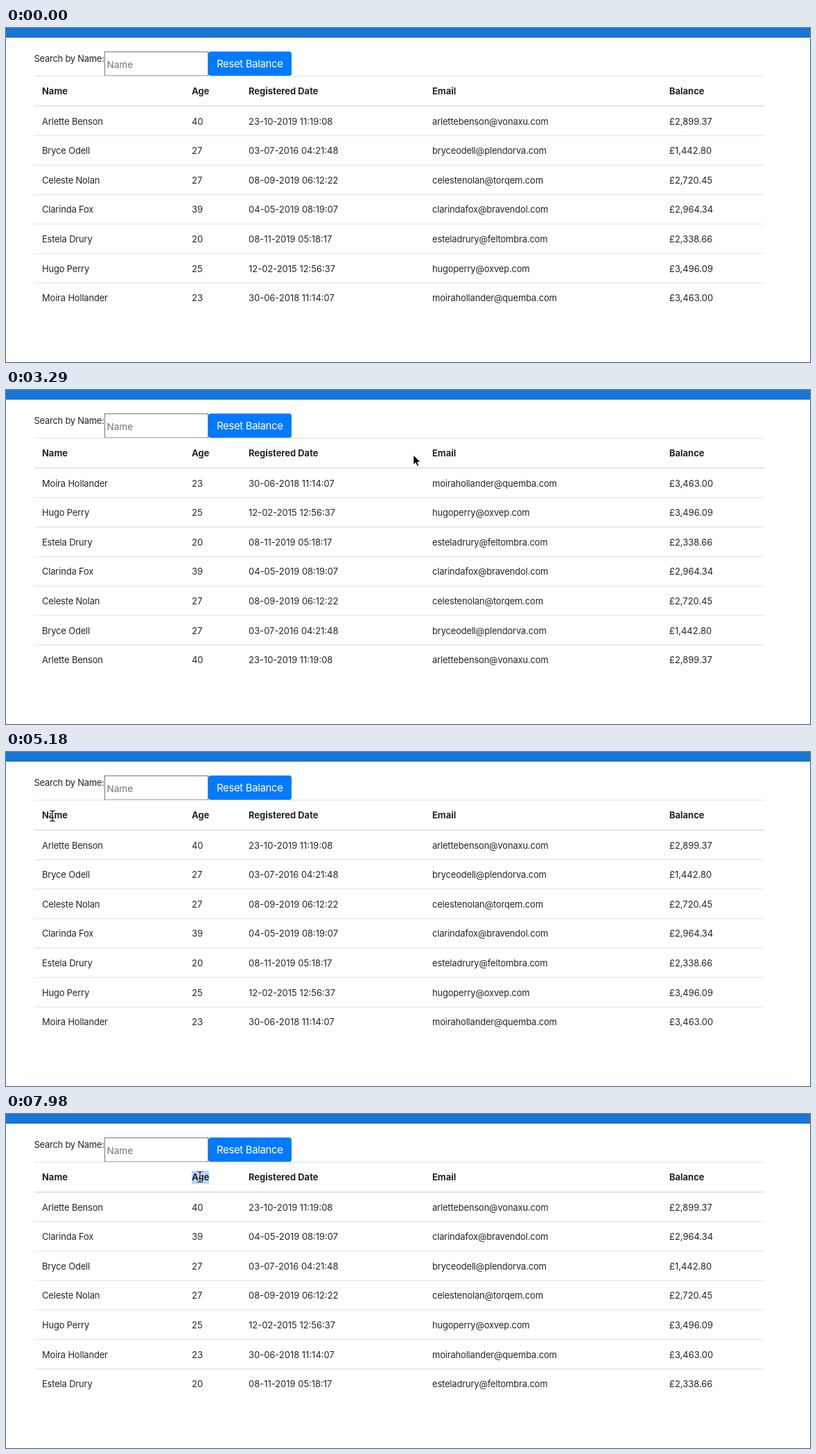
An HTML page for the animation above (8 s loop, 1160x483 px).

```html
<!DOCTYPE html>
<html lang="en">
<head>
<meta charset="utf-8">
<title>Sortable table</title>
<style>
  html, body { margin: 0; width: 100%; height: 100%; overflow: hidden; background: #fff; }
  svg { display: block; width: 1160px; height: 483px; }
  text { font: 12.96px Inter, "Liberation Sans", sans-serif; fill: #212529; white-space: pre; }
  .head text { font-weight: 700; }
  .letters { letter-spacing: -.17px; }
  .label { letter-spacing: -.25px; }
  .placeholder { font-size: 13.6px; fill: #757575; }
  .button { font-size: 14.8px; letter-spacing: -.27px; fill: #fff; }
  .line { fill: #dee2e6; }
  .halo { stroke: #fff; stroke-width: 3; }
  .ink { stroke: #000; stroke-width: 1.2; }
</style>
</head>
<body>
<svg id="stage" viewBox="0 0 1160 483">
  <defs>
    <path id="beamShape" fill="none"
      d="M-3.6 -7.6Q-.4 -7.6 0 -6.2Q.4 -7.6 3.6 -7.6M0 -6.2V6.2M-3.6 7.6Q-.4 7.6 0 6.2Q.4 7.6 3.6 7.6M-2 2.4H2"/>
  </defs>
  <rect width="1160" height="14" fill="#1976d2"/>
  <text class="label" x="40.5" y="49">Search by Name:</text>
  <rect x="142.5" y="34.5" width="149" height="34.5" fill="#fff" stroke="#767676"/>
  <text class="placeholder" x="145.5" y="57.5">Name</text>
  <rect x="292" y="34" width="120" height="35.3" rx="3.7" fill="#007bff"/>
  <text class="button" x="304" y="57.3">Reset Balance</text>
  <rect id="highlight" x="268" y="82" width="25" height="19" fill="#b3d7ff"/>
  <g id="lines"></g>
  <g id="head" class="head"></g>
  <g id="rows"></g>
  <g id="cursor">
    <path id="arrow" d="M0 0V14.2L3.3 11.2L5.5 16.3L8 15.2L5.8 10.2H10.2Z"
      fill="#000" stroke="#fff" stroke-linejoin="round"/>
    <g id="beam">
      <use href="#beamShape" class="halo"/>
      <use href="#beamShape" class="ink"/>
    </g>
  </g>
</svg>
<script>
const LOOP = 8000, STEP = 70, ROW = 42.6, ENTER = 350, SELECT = 7700;
const $ = id => document.getElementById(id);
const columns = [
  { title: 'Name', x: 52, style: 'letters' },
  { title: 'Age', x: 268 },
  { title: 'Registered Date', x: 350 },
  { title: 'Email', x: 615, style: 'letters' },
  { title: 'Balance', x: 957 }
];
const people = [
  ['Arlette Benson', '40', '23-10-2019 11:19:08', 'vonaxu', '£2,899.37'],
  ['Bryce Odell', '27', '03-07-2016 04:21:48', 'plendorva', '£1,442.80'],
  ['Celeste Nolan', '27', '08-09-2019 06:12:22', 'torqem', '£2,720.45'],
  ['Clarinda Fox', '39', '04-05-2019 08:19:07', 'bravendol', '£2,964.34'],
  ['Estela Drury', '20', '08-11-2019 05:18:17', 'feltombra', '£2,338.66'],
  ['Hugo Perry', '25', '12-02-2015 12:56:37', 'oxvep', '£3,496.09'],
  ['Moira Hollander', '23', '30-06-2018 11:14:07', 'quemba', '£3,463.00']
].map(([name, age, date, host, balance]) =>
  [name, age, date, `${name.toLowerCase().replace(' ', '')}@${host}.com`, balance]);

// Each click sorts by a column and flips the direction.
const clicks = [
  { at: 2730, column: 3 },
  { at: 4200, column: 3 },
  { at: 5950, column: 0 },
  { at: 6440, column: 0 },
  { at: 7630, column: 1 }
];

// Each move eases the pointer from where it rests to a new place.
const entry = { x: 755, y: 468 };
const moves = [
  { from: ENTER, to: 630, x: 786, y: 319 },
  { from: 770, to: 1120, x: 801, y: 169 },
  { from: 1120, to: 2310, x: 632.5, y: 91 },
  { from: 3220, to: 3430, x: 552, y: 96.5 },
  { from: 3430, to: 4480, x: 636.5, y: 82.5 },
  { from: 4480, to: 5180, x: 67, y: 92.5 },
  { from: 6440, to: 7070, x: 279.8, y: 91 }
];

function add(parent, tag, attrs, content = '') {
  const el = document.createElementNS('http://www.w3.org/2000/svg', tag);
  for (const key in attrs) el.setAttribute(key, attrs[key]);
  el.textContent = content;
  return parent.appendChild(el);
}

const addCells = (group, values, styled) => values.forEach((value, i) =>
  add(group, 'text', { x: columns[i].x, y: 96, class: styled && columns[i].style || '' }, value));

const addLine = (y, height) =>
  add($('lines'), 'rect', { class: 'line', x: 40.5, y, width: 1053, height });

addLine(69.2, 1);
addLine(112, 1.7);
for (let i = 1; i < people.length; i++) addLine(112.6 + i * ROW, 1);

addCells($('head'), columns.map(column => column.title));
const rows = people.map(person => {
  const el = add($('rows'), 'g', {});
  addCells(el, person, true);
  return { person, el };
});
const texts = [...document.querySelectorAll('#head text, #rows text')];

function sortRows(t) {
  const done = clicks.filter(click => click.at <= t);
  const column = done.length ? done[done.length - 1].column : 0;
  const direction = done.length % 2 ? -1 : 1;
  const compare = (a, b) => direction * a.person[column].localeCompare(b.person[column]);
  [...rows].sort(compare).forEach((row, i) =>
    row.el.setAttribute('transform', `translate(0 ${43.6 + i * ROW})`));
}

function pointerAt(t) {
  return moves.reduce((pos, move) => {
    const k = Math.min(1, Math.max(0, (t - move.from) / (move.to - move.from)));
    const ease = k * (2 - k);
    return { x: pos.x + (move.x - pos.x) * ease, y: pos.y + (move.y - pos.y) * ease };
  }, entry);
}

function overText({ x, y }) {
  const origin = $('stage').getBoundingClientRect();
  const px = x + origin.left, py = y + origin.top;
  return texts.some(el => {
    const box = el.getBoundingClientRect();
    return px >= box.left && px <= box.right && py >= box.top - 3 && py <= box.bottom + 3;
  });
}

const show = (id, on) => $(id).setAttribute('visibility', on ? 'visible' : 'hidden');

function draw(t) {
  sortRows(t);
  const pos = pointerAt(t), visible = t >= ENTER, beam = overText(pos);
  $('cursor').setAttribute('transform', `translate(${pos.x} ${pos.y})`);
  show('beam', visible && beam);
  show('arrow', visible && !beam);
  show('highlight', t >= SELECT);
}

const start = performance.now();
let shown = -1;
function tick() {
  const t = Math.floor((performance.now() - start) % LOOP / STEP) * STEP;
  if (t !== shown) draw(shown = t);
  requestAnimationFrame(tick);
}
tick();
</script>
</body>
</html>
```
